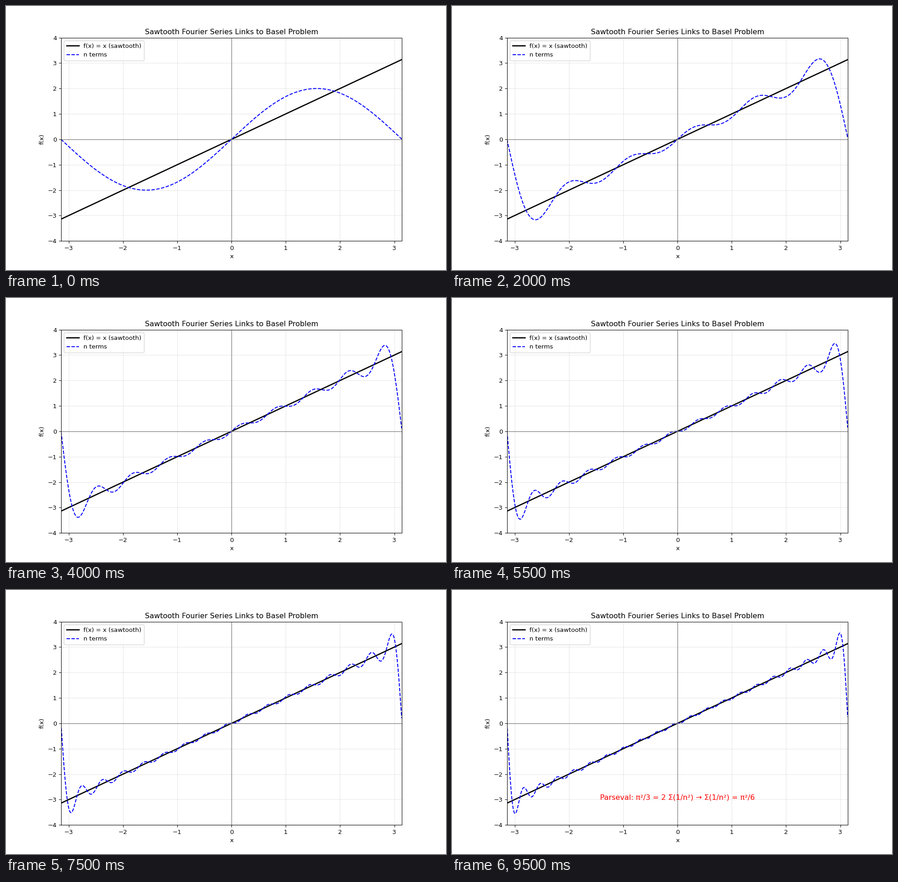
Recreate the animation shown at these times as a matplotlib script. Size 966 by 580 pixels, loop 10 s.

```python
import numpy as np
import matplotlib.pyplot as plt
from matplotlib.animation import FuncAnimation

TERMS = 20
INTERVAL = 500

x = np.linspace(-np.pi, np.pi, 1000, endpoint=False)


def partial_sum(n):
    """Sawtooth Fourier series cut off after n terms."""
    k = np.arange(1, n + 1)[:, None]
    return (2 * (-1.0) ** (k + 1) / k * np.sin(k * x)).sum(axis=0)


# 966 by 580 pixels
fig, ax = plt.subplots(figsize=(10, 6.0042), dpi=96.6)
ax.plot(x, x, "k", lw=2, label="f(x) = x (sawtooth)")
series, = ax.plot(x, partial_sum(1), "b--", lw=1.5, label="n terms")
ax.axhline(0, color="gray", lw=1)
ax.axvline(0, color="gray", lw=1)
ax.set(xlim=(-np.pi, np.pi), ylim=(-4, 4), xlabel="x", ylabel="f(x)",
       title="Sawtooth Fourier Series Links to Basel Problem")
ax.grid(True, alpha=0.3)
ax.legend(loc="upper left")

conclusion = ax.text(0, -3, "Parseval: π²/3 = 2 Σ(1/n²) → Σ(1/n²) = π²/6",
                     color="red", fontsize=12, ha="center", visible=False)


def update(frame):
    n = frame + 1
    series.set_ydata(partial_sum(n))
    conclusion.set_visible(n == TERMS)
    return series, conclusion


animation = FuncAnimation(fig, update, frames=TERMS, interval=INTERVAL,
                          repeat=True, repeat_delay=0)
plt.show()
```
